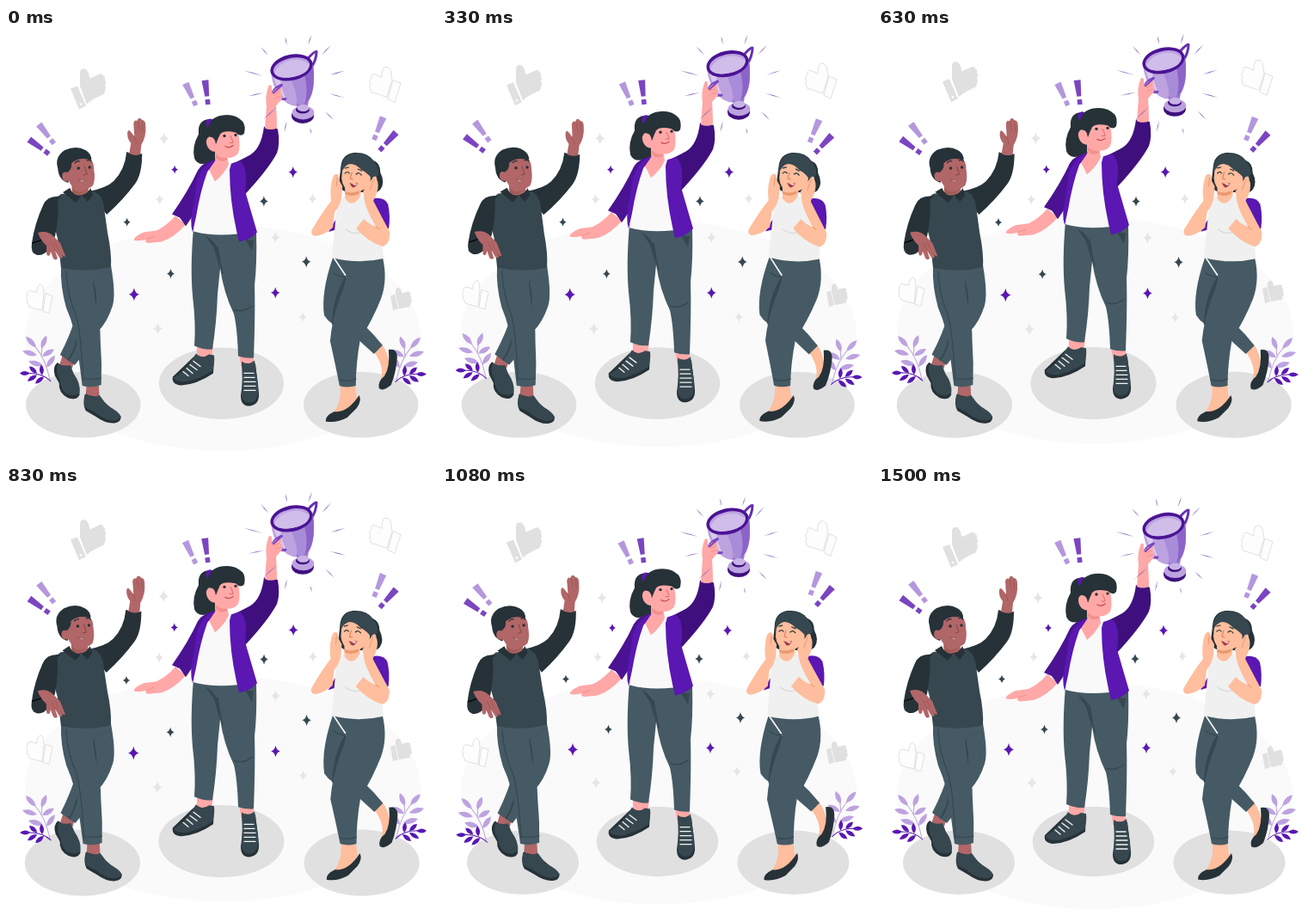
An HTML page that plays this animation: 500 by 500 pixels, repeating every 1.54 s.

```html
<!DOCTYPE html>
<html lang="en">
<head>
<meta charset="utf-8">
<title>Celebrating a win</title>
<style>
html, body { margin: 0; width: 100%; height: 100%; overflow: hidden; background: #fff; }
svg { display: block; width: 100vw; height: 100vh; }
.line { fill: none; stroke-linecap: round; stroke-linejoin: round; }
.dark { fill: #263238; } .slate { fill: #37474f; } .pants { fill: #455a64; }
.pale { fill: #e0e0e0; } .purple { fill: #5a17b2; } .deep { fill: #3f107d; }
.brown { fill: #b16668; } .pink { fill: #ffa8a7; } .peach { fill: #ffbe9d; }
.outline { fill: #fdfdfd; stroke: #e0e0e0; stroke-linejoin: round; }
.ink { stroke: #263238; } .lace { stroke: #f5f5f5; stroke-width: 1.3; } .fold { stroke: #37474f; }
</style>
</head>
<body>
<svg viewBox="0 0 500 500">
  <g class="float">
    <ellipse cx="252" cy="360.5" rx="230" ry="131.5" fill="#fafafa"/>
    <g class="pale">
      <path d="M75 71 83 68 93 91 85 95Z"/>
      <path d="M86 68 86 53Q86 47 92 48 96 50 97 58L98 59 109 54Q113 53 113 56 116 57 115 61 117 64 115 67 117 70 115 73 115 78 110 79L104 82Q98 85 94 89Z"/>
      <path d="M447 312 452 310 456 327 450 329Z"/>
      <path d="M453 311 453 305Q455 301 458 303 460 306 460 309L467 307Q471 307 470 311 472 313 471 316 473 319 470 321 471 325 467 325L457 327Z"/>
      <circle cx="87" cy="89" r="1.3" fill="#fff"/>
    </g>
    <g class="outline">
      <path d="M450 61 459 65 452 87 444 83Z"/>
      <path d="M449 61 447 49Q443 44 439 47 436 52 437 58L428 54Q424 54 425 59 421 62 424 66 421 69 424 72 423 76 428 76L443 81Z"/>
      <path d="M46 309 54 312 50 332 43 330Z"/>
      <path d="M44 309 43 301Q41 297 38 300 35 304 36 308L28 306Q24 307 25 311 22 314 25 317 23 320 26 322 26 326 30 326L42 329Z"/>
    </g>
  </g>

  <g class="beat" data-at="251 424.5">
    <g class="pale">
      <ellipse cx="94" cy="437.7" rx="65" ry="37.3"/>
      <ellipse cx="250.5" cy="413.5" rx="70.7" ry="40.7"/>
      <ellipse cx="408.5" cy="437.7" rx="65" ry="37.3"/>
    </g>
  </g>

  <g class="wind" data-at="252.5 386">
    <g id="plantL"></g><g id="plantR" transform="matrix(-1 0 0 1 505 0)"></g>
  </g>
  <g class="wind" data-at="240 106" id="marks"></g>

  <!-- man -->
  <g class="wind" data-at="96 282">
    <path class="brown" d="M68 374 80 386 77 396 62 393Z"/>
    <path class="dark" d="M60 389Q54 394 57 404L62 413Q61 424 72 430 83 434 86 426L80 404Z"/>
    <path class="slate" d="M61 390Q66 394 75 392L79 402Q87 413 86 424 80 430 70 425 64 420 63 410 57 400 61 390Z"/>
    <path class="pants" d="M88 280 122 276Q128 310 124 323 118 342 107 353 95 375 80 392L63 380Q76 355 83 330Z"/>
    <path class="line" stroke="#37474f" stroke-width="2" d="M84 350Q83 372 73 386"/>
    <path class="brown" d="M94 412H108L109 430Q100 434 93 429Z"/>
    <path class="dark" d="M92 426Q89 438 93 445L105 452Q116 460 126 459.500 134 459 134 452L109 430Z"/>
    <path class="slate" d="M93 425Q100 431 109 427L118 439Q132 446 134 452 131 457 122 456 112 454 104 447L92 441Q90 432 93 425Z"/>
    <path class="pants" d="M64 278Q63 300 70 325 81 350 84 378L89 416Q100 419 111 415 112 390 110 365 110 340 104 320L103 303 122 288 122 276Z"/>
    <path class="slate" d="M121 283Q104 292 102 296 106 308 105 325 102 305 101 295Z"/>
    <path class="line fold" stroke-width="1.2" d="M70 283Q71 310 82 335 88 360 90 410M89 407Q100 410 111 407"/>
    <path class="dark" d="M96 190Q117 186 125 178 138 165 140 144 150 149 158 146 158 170 150 181 136 200 117 217Z"/>
    <path class="brown" d="M143 146 145 134Q140 128 141 121 142 117 145 121L149 126 148 111Q149 106 152 108 154 102 158 107 162 107 162 114 163 126 157 136L156 147Q149 149 143 146Z"/>
    <path class="line" stroke="#9f5b53" d="M153 109 155 119M158 109 159 120M148 126Q151 129 151 134"/>
    <path class="slate" d="M64 193 98 189Q109 190 113 203L118 238Q123 262 122 278 95 285 64 279L60 245Q52 220 55 200Z"/>
    <path class="brown" d="M75 172 77 192Q86 202 96 190L95 180Z"/>
    <path d="M76 186Q84 194 94 188 87 196 78 192Z" fill="#9f5b53"/>
    <path class="dark" d="M66 191 74 186Q79 197 88 194 95 193 98 186L101 194 95 202 88 195 81 203Z"/>
    <path class="dark" d="M64 196Q48 194 43 206 33 228 30 250 28 262 36 264 44 265 50 257L57 242Q62 215 60 200Z"/>
    <path class="line" stroke="#000" stroke-width="1.200" d="M31 250Q39 248 47 243"/>
    <path class="brown" d="M37 238Q48 235 55 242L63 250 69 265Q68 267 65 264L61 258 66 266Q65 269 62 267L57 259 60 268Q58 271 55 268L52 260 51 264Q47 267 47 260L47 253Q40 247 37 238Z"/>
    <path class="line" stroke="#9f5b53" d="M53 250 57 259M57 249 61 258"/>
    <path class="dark" d="M60 163Q56 150 68 142 82 136 92 142 100 146 99 155L78 165 72 180Q61 177 60 163Z"/>
    <path class="brown" d="M71 168Q77 164 76 157 86 149 99 154 102 157 102 164 104 176 101 183 92 191 82 187 75 184 73 178 66 180 65 173 65 166 71 168Z"/>
    <path class="line ink" stroke-width="1.300" d="M80 157Q82 154 85 155M94 154Q97 153 99 155"/>
    <circle class="dark" cx="84" cy="163" r="1.800"/><circle class="dark" cx="97" cy="162" r="1.700"/>
    <path class="line" stroke="#854a43" d="M91 161Q93 167 94 170L90 171"/>
    <path fill="#fff" stroke="#7d413d" stroke-width=".6" d="M84 176Q87 178 91 177 89 181 84 176Z"/>
  </g>

  <!-- winner -->
  <g class="float">
    <path class="dark" d="M243 107Q222 104 224 124 216 138 219 152 224 164 243 154L248 125Z"/>
    <path class="purple" d="M233 108Q238 104 241 108L236 117Q231 115 233 108Z"/>
    <path class="pink" d="M197 219Q186 231 175 236L160 238Q149 243 148.500 247 154 249 163 246.500 160 250 166 250.500L181 249Q196 244 209 229Z"/>
    <path class="line" stroke="#f28f8f" d="M163 246 172 243"/>
    <path d="M244 154Q229 156 223 166 212 190 193 217L202 221 205 225 209 231Q224 210 234 188Z" fill="#4b1393"/>
    <path class="pink" d="M222 366 241 370 239 385 222 386Z"/><path class="pink" d="M271 378H288L288 394 273 394Z"/>
    <path class="dark" d="M218 383 194 406Q192 415 204 416 222 415 241 402L242 384Z"/>
    <path class="slate" d="M221 379Q228 386 236 380L242 381Q243 390 240 399 228 407 211 411.500 197 413 195 407 207 400 213 391Z"/>
    <path class="line lace" d="M218 388 226 394M214 392 222 398M210 396 217 402M206 400 212 405"/>
    <path class="dark" d="M274 390Q276 410 273 428 273 441 284 440 295 438 294 425L290 391Z"/>
    <path class="slate" d="M274 388Q281 394 289 387L293 414Q295 434 285 436 274 437 274 425 276 410 274 388Z"/>
    <path class="line lace" d="M277 402H288M277 407H289M277 412H290M277 417H290M277 422H290"/>
    <path class="pants" d="M218 233 291 238Q292 275 289 300 290 330 288 384 279 385 270 382 269 350 265 333 253 308 249 280L246 310Q245 342 240 374 230 375 219 370 221 345 217 312 214 280 218 233Z"/>
    <path class="slate" d="M232 242Q246 250 247 262L249 282 242 257ZM278 246 288 247 286 260Z"/>
    <path class="line fold" stroke-width="1.500" d="M246 255Q250 280 252 286M266 328Q275 332 286 324"/>
    <path d="M234 166 262 158Q267 195 269 240 240 243 218 237L222 200Z" fill="#f9f9f9"/>
    <path class="pink" d="M243 140V155L236 165 243 179Q254 170 259 159L257 147Z"/>
    <path d="M244 147Q250 153 257 151L257 154Q249 158 244 151Z" fill="#f28f8f"/>
    <path class="purple" d="M244 153 234 168Q226 190 221 220L217 238Q213 226 218 205L222 178Q228 160 244 153Z"/>
    <path class="deep" d="M262 159Q275 153 284 148 297 140 300 115L305 118 311 116 316 118Q319 135 315 146 305 165 276 196L270 215Z"/>
    <path class="purple" d="M262 158 272 155Q282 163 278 190L292 238Q284 247 271 249L268 236Q260 200 260 165Z"/>
    <path class="pink" d="M245 122Q262 114 270 122 273 138 270 146 264 153 256 151 249 149 246 144 238 146 234 138 231 130 236 127 240 126 245 130Z"/>
    <path class="dark" d="M234 124Q234 104 252 102 266 100 275 109 279 114 277 123 273 128 267 122 253 119 249 124 246 130 244 136 243 127 237 127Z"/>
    <circle class="dark" cx="254" cy="126" r="1.700"/><circle class="dark" cx="267" cy="125" r="1.600"/>
    <path class="line ink" stroke-width="1.200" d="M250 122Q252 119 255 120M265 119Q267 118 269 120"/>
    <path class="line" stroke="#d9696c" d="M261 126Q264 132 264 134L260 134"/>
    <path class="line" stroke="#c54b55" stroke-width="1.300" d="M255 138Q260 141 264 137"/>

    <!-- trophy -->
    <path class="line" stroke="#6530b0" stroke-width="3" d="M352 35Q359 27 361 28 361 38 354 48"/>
    <path d="M308 50Q310 76 327 88 340 95 350 88 361 74 357 43Z" fill="#bda2e0"/>
    <path d="M332 62Q340 80 338 91 346 92 350 88 361 74 357 43 350 56 332 62Z" fill="#a98cd9"/>
    <path d="M347 55Q352 75 347 90 361 78 357 43Z" fill="#8c64c8"/>
    <path d="M311 57Q316 76 327 86 320 71 319 61Z" fill="#d9caee"/>
    <g transform="rotate(-13 332 46.500)">
      <ellipse cx="332" cy="46.500" rx="25" ry="15" fill="#4b1393"/>
      <ellipse cx="332" cy="46.500" rx="21.500" ry="11" fill="#bda2e0"/>
      <path d="M311 48Q319 38 332 38 346 38 353 48 350 58 332 57.500 314 57 311 48Z" fill="#d0bdea"/>
    </g>
    <path d="M337 88Q343 92 352 86L349 97 341 98Z" fill="#9b78d0"/>
    <ellipse cx="345" cy="102.500" rx="13" ry="9" class="deep"/>
    <ellipse cx="345.500" cy="99" rx="12.800" ry="8" fill="#bda2e0"/>
    <ellipse cx="345" cy="95.500" rx="8" ry="4.500" class="deep"/>
    <ellipse cx="345.500" cy="93.500" rx="7" ry="4" fill="#c8b3e6"/>
    <path class="line" stroke="#7b45c1" stroke-width="3" d="M320 67Q309 72 310 79 313 84 325 83"/>
    <path class="pink" d="M301 117 303 91Q301 80 305 69 306 65 309 68L309 76Q316 68 319 70 322 72 319 75 323 77 320 80 323 83 318 86L314 91Q315 106 315 117 308 120 301 117Z"/>
    <path class="line" stroke="#f28f8f" d="M312 78 318 75M313 82 319 80"/>
    <path class="line" stroke="#7b45c1" stroke-width="2" d="M311 76 321 67"/>
  </g>

  <!-- friend -->
  <g class="wind" data-at="404 302">
    <path class="peach" d="M427 375 436 366Q444 376 446 390L443 410 436 408Q441 394 427 375Z"/>
    <path class="dark" d="M445 374Q455 372 455 383 454 400 448 415 439 423 434 419 432 411 440 405 447 395 445 374Z"/>
    <path class="pants" d="M380 267Q366 308 370 334 378 347 393 348 412 364 428 379L438 369Q427 355 415 344L402 300Z"/>
    <path class="slate" d="M395 288Q380 312 379 345 390 350 400 352L410 342Z"/>
    <path class="peach" d="M389 412H406L408 428 412 432 390 449 380 449Q388 438 389 426Z"/>
    <path class="dark" d="M411 427Q414 434 408 442L397 453Q384 460 372 457.500 371 451 382 446 397 448 411 427Z"/>
    <path class="pants" d="M382 267 438 267Q444 293 436 315 426 340 412 362 407 390 407 416 397 419 388 416 384 395 377 364 379 340 388 314 394 300 396 288Z"/>
    <path class="line fold" stroke-width="1.300" d="M381 285Q392 292 396 288M388 409Q398 412 407 408"/>
    <path class="dark" d="M389 162Q390 147 404 145 420 144 427 154 435 157 435 168 441 180 435 188 430 193 422 191L396 191Q387 188 387 180Z"/>
    <path d="M385 206 392 196 411 195 430 199Q437 240 439 268 410 275 379 267L382 230Z" fill="#f0f0f0"/>
    <path class="peach" d="M394 184V198Q403 211 412 195L413 184Z"/>
    <path d="M394 190Q404 194 412 187L410 193Q402 197 394 193Z" fill="#eb996e"/>
    <path class="line" stroke="#d8d8d8" stroke-width="1.200" d="M395 234Q405 242 416 236"/>
    <path class="peach" d="M391 163Q396 155 408 156 418 163 424 170L423 184Q411 192 401 190 391 187 390 175Z"/>
    <path class="slate" d="M389 170Q389 148 404 146 421 145 427 155 433 160 433 170L427 179Q422 169 413 165 407 158 400 158 393 159 389 170Z"/>
    <path class="line ink" stroke-width="1.200" d="M394 169Q397 166 399 169M407 170Q410 167 413 171M394 163 398 162M409 164 413 166"/>
    <path class="line" stroke="#d57d59" d="M402 168 400 175 403 176"/>
    <path d="M399 180Q404 182 409 180 406 187 402 185Z" fill="#a23c46"/><path d="M400 180Q404 182 408 181L406 183Z" fill="#fff"/>
    <path class="purple" d="M383 223 382 235 375 237Z"/>
    <path class="peach" d="M379 176Q381 169 384 170 387 169 387 177L391 184 390 197Q388 207 382 214L380 232Q370 241 359 242 353 240 356 234 369 212 378 201 376 188 379 176Z"/>
    <path class="purple" d="M427 198Q440 196 444 205 447 218 445 233L433 237Q424 215 427 198Z"/>
    <path class="peach" d="M415 190 422 180 427 173Q431 171 431 176 434 182 431 192L427 201Q438 222 446 237 447 251 438 254 421 249 407 233L416 222Q423 229 430 231 419 212 417 202Z"/>
    <path class="line" stroke="#eb996e" d="M385 174 384 184M427 176 423 188M430 231 434 234"/>
  </g>

  <g class="beat" data-at="267 182" id="sparks"></g>
</svg>
<script>
const LOOP = 1540, STEPS = 37;
const $ = id => document.getElementById(id);

const leaf = (x, y, u, v, w, color) => {
  const mx = (x + u) / 2, my = (y + v) / 2, d = Math.hypot(u - x, v - y);
  const a = (v - y) / d * w, b = (x - u) / d * w;
  return `<path fill="${color}" d="M${x} ${y}Q${mx + a} ${my + b} ${u} ${v}Q${mx - a} ${my - b} ${x} ${y}Z"/>`;
};

const plant = () => {
  const light = '#bda2e0', deep = '#5a17b2';
  const pale = [[35, 372, 23, 359], [41, 373, 47, 358], [36, 381, 19, 376], [42, 382, 56, 374], [43, 393, 26, 388], [47, 395, 57, 381]];
  const dark = [[28, 402, 16, 402], [36, 402, 27, 394], [42, 404, 41, 392], [36, 404, 25, 411], [44, 406, 34, 414]];
  return `<g class="line"><path stroke="${light}" d="M51 409Q46 385 34 371M41 382 42 372"/><path stroke="${deep}" d="M52 411Q42 401 24 402"/></g>` +
    pale.map(p => leaf(...p, 6, light)).join('') + dark.map(p => leaf(...p, 5, deep)).join('');
};
$('plantL').innerHTML = $('plantR').innerHTML = plant();

const mark = (x, y, angle, color) =>
  `<path fill="${color}" transform="translate(${x} ${y}) rotate(${angle})" d="M-4-25.500H4L2.500-6.500H-2.500ZM-2.800-3H2.800V3H-2.800Z"/>`;
$('marks').innerHTML = [
  [54, 132.5, -38, 0], [47.5, 145, -54, 1],
  [219.5, 87.5, -25, 0], [234.5, 86, -7, 1],
  [429, 127, 22, 0], [436.5, 140, 42, 1]
].map(([x, y, a, k]) => mark(x, y, a, k ? '#7b45c1' : '#b497dd')).join('');

const star = (x, y, r, color) => {
  const q = r * .17, h = r * .8;
  return `<path fill="${color}" transform="translate(${x} ${y})" d="M0 ${-r}Q${q} ${-q} ${h} 0Q${q} ${q} 0 ${r}Q${-q} ${q} ${-h} 0Q${-q} ${-q} 0 ${-r}Z"/>`;
};
const stars = {
  '#e6e6e6': [[186, 130, 7], [181, 199, 6], [312, 242, 6.5], [354, 198, 6], [343, 332, 6], [179, 345, 7]],
  '#5a17b2': [[198, 165, 5], [332, 168, 6.5], [152, 306.5, 7.5], [312, 304.5, 6.5]],
  '#37474f': [[144, 224.5, 5], [193.5, 283, 5.5], [299, 201, 6], [347, 269.5, 6.5]]
};
const rays = [
  [304, 36, 295, 26], [298, 59, 276, 53], [299, 78, 281, 82], [314, 94, 298, 109],
  [325, 110, 322, 123], [351, 118, 353, 125], [368, 99, 378, 109], [373, 79, 391, 84],
  [374, 58, 391, 53], [364, 36, 375, 24], [349, 24, 353, 12], [325, 24, 323, 14]
];
$('sparks').innerHTML =
  Object.entries(stars).map(([c, list]) => list.map(s => star(...s, c)).join('')).join('') +
  rays.map(r => leaf(...r, 1, '#8d6fc0')).join('');

// piecewise linear value over [phase, value] keys
const track = keys => p => {
  const i = keys.findIndex(k => k[0] >= p);
  if (i < 1) return keys[0][1];
  const [a, x] = keys[i - 1], [b, y] = keys[i];
  return x + (y - x) * (p - a) / (b - a);
};
const lift = track([[0, 0], [.5, -10], [1, 0]]);
const sway = track([[0, 0], [.25, 1], [.75, -1], [1, 0]]);
const beat = track([[0, 1], [.1, 1.1], [.3, 1], [.4, 1], [.5, 1.1], [.6, 1], [1, 1]]);

const each = (sel, fn) => {
  const list = [...document.querySelectorAll(sel)].map(el => [el, (el.dataset.at || '0 0').split(' ').map(Number)]);
  return p => list.forEach(([el, at]) => el.setAttribute('transform', fn(p, ...at)));
};
const movers = [
  each('.float', p => `translate(0 ${lift(p)})`),
  each('.wind', (p, x, y) => `rotate(${sway(p)} ${x} ${y})`),
  each('.beat', (p, x, y) => `translate(${x} ${y}) scale(${beat(p)}) translate(${-x} ${-y})`)
];

// the scene runs at about 24 steps per second, one step into the cycle
const draw = ms => {
  const step = Math.floor((ms + 5) / LOOP * STEPS) + 1;
  const p = step % STEPS / STEPS;
  movers.forEach(move => move(p));
};

const start = performance.now();
const tick = () => {
  draw(performance.now() - start);
  requestAnimationFrame(tick);
};
draw(0);
requestAnimationFrame(tick);
</script>
</body>
</html>
```
